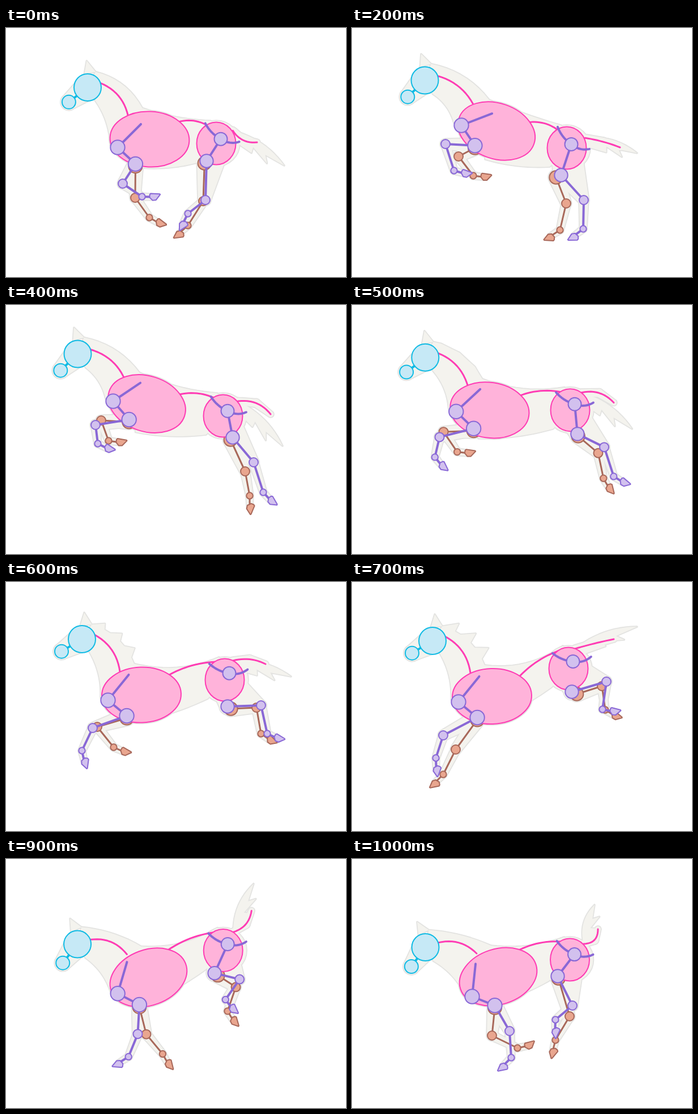
These frames come from a looping animation (600 by 440 pixels, 1100 ms). An HTML page with a canvas:

```html
<!DOCTYPE html>
<html lang="en">
<head>
<meta charset="utf-8">
<title>Galloping horse</title>
<style>
html, body { margin: 0; width: 100%; height: 100%; overflow: hidden; background: #fff; }
canvas { display: block; }
</style>
</head>
<body>
<canvas id="stage" width="600" height="440"></canvas>
<script>
const ctx = document.getElementById('stage').getContext('2d');
const STEP = 100, STEPS = 11, KEYS = [0, 2, 4, 6, 7, 8, 10];
const PINK = ['#ffb3da', '#ff3cb4'], BLUE = ['#c6e9f6', '#10bbe4'];
const VIOLET = ['#d2c1ee', '#8968d6'], BROWN = ['#e9a68f', '#a8685a'];
const COAT = '#f4f3ee', EDGE = '#e3e3e1';

// --- Motion: smooth cyclic tracks through one point or angle per key step ---

function track(...values) {
  const n = KEYS.length, size = values.length / n;
  const key = i => {
    const turn = Math.floor(i / n), k = i - turn * n;
    return { t: KEYS[k] + turn * STEPS, v: values.slice(k * size, (k + 1) * size) };
  };
  return step => {
    const i = KEYS.findLastIndex(t => t <= step);
    const [a, b, c, d] = [i - 1, i, i + 1, i + 2].map(key);
    const h = c.t - b.t, u = (step - b.t) / h, w = 1 - u;
    return b.v.map((y, k) => {
      const m = (c.v[k] - a.v[k]) / (c.t - a.t) * h;
      const q = (d.v[k] - y) / (d.t - b.t) * h;
      return y * w * w * (1 + 2 * u) + c.v[k] * u * u * (3 - 2 * u) + u * w * (m * w - q * u);
    });
  };
}

const wave = (step, peak) => Math.cos(2 * Math.PI * (step - peak) / STEPS);

const body = {
  skull: track(144,105, 128.5,92.5, 126.5,86.5, 134,101, 142,104, 127.5,132, 129.5,156),
  nod: track(142, 136, 136, 149, 149, 135, 126),
  chest: track(253.5,196.5, 255,182, 248.5,174.5, 239,199.5, 247,202, 244.5,208, 258,208),
  tilt: track(3, 19, 18, -2, -2, -17, -18),
  rump: track(371,204, 379,212, 383,196, 386,173, 382,153, 380,150, 384.5,178),
  shoulder: track(197,211, 193,172, 189,170, 180,209, 188,212, 181,225, 212,243),
  scapula: track(-45, -21, -34, -51, -51, -56, -84),
  stifle: track(354,235, 369,260, 400,234, 391,220, 388,194, 374,200, 363,207),
  dock: track(443,202, 473,211, 467,193, 458,145, 462,101, 438,76, 434,124),
  hair: track(491,243, 503,221, 488,249, 503,167, 503,79, 463,40, 428,81)
};

// Lower legs: knee or hock, ankle, and the direction of the hoof.
const nearFore = [
  track(206,275, 165,205, 158,212, 153,258, 161,271, 173,304, 278,304),
  track(240,298, 180,252, 162,245, 134,298, 148,311, 145,335, 281,351),
  track(2, 16, 27, 78, 88, 131, 135)
];
const nearHind = [
  track(352,304, 409,304, 437,278, 450,218, 449,176, 432,174, 389,259),
  track(321,328, 408,355, 454,331, 461,268, 442,225, 414,221, 359,284),
  track(117, 143, 48, 25, 12, 17, 92)
];
const farFore = [
  track(228,300, 188,227, 168,204, 161,256, 183,296, 236,304, 247,312),
  track(253,335, 214,261, 181,240, 190,292, 161,340, 241,353, 292,334),
  track(30, 7, 8, 24, 135, 140, -12)
];
const farHind = [
  track(348,306, 378,310, 422,294, 442,222, 441,184, 424,180, 384,278),
  track(321,349, 367,357, 430,337, 450,268, 447,226, 421,223, 359,320),
  track(138, 147, 90, 36, 32, 21, 104)
];

// --- Geometry ---

const rad = deg => deg * Math.PI / 180;
const add = ([x, y], dx, dy) => [x + dx, y + dy];
const polar = (p, r, deg) => add(p, r * Math.cos(rad(deg)), r * Math.sin(rad(deg)));
const angle = (a, b) => Math.atan2(b[1] - a[1], b[0] - a[0]) * 180 / Math.PI;

// Point at share u of a to b, moved sideways.
const beside = (a, b, u, side) =>
  polar([a[0] + (b[0] - a[0]) * u, a[1] + (b[1] - a[1]) * u], side, angle(a, b) + 90);

const bow = (a, b, bend, n = 12) =>
  Array.from({ length: n + 1 }, (_, i) => beside(a, b, i / n, bend * 4 * i / n * (1 - i / n)));

function poly(pts, closed = true) {
  const path = new Path2D();
  pts.forEach(p => path.lineTo(...p));
  if (closed) path.closePath();
  return path;
}

function ellipse([x, y], rx, ry, tilt = 0) {
  const path = new Path2D();
  path.ellipse(x, y, rx, ry, rad(tilt), 0, 7);
  return path;
}

// Two discs of different size joined by straight sides.
function taper(a, ra, b, rb) {
  const path = new Path2D(), t = rad(angle(a, b)), q = Math.PI / 2;
  path.arc(...a, ra, t + q, t + 3 * q);
  path.arc(...b, rb, t - q, t + q);
  path.closePath();
  return path;
}

// --- Drawing ---

function stroke(path, color, width) {
  ctx.strokeStyle = color;
  ctx.lineWidth = width;
  ctx.stroke(path);
}

function shape(path, [fill, line]) {
  ctx.fillStyle = fill;
  ctx.fill(path);
  stroke(path, line, 2);
}

const disc = (p, r, colors) => shape(ellipse(p, r, r), colors);
const line = (pts, color, width) => stroke(poly(pts, false), color, width);

const HOOF = [[9, -5], [8, -6], [-8, -6], [-9.5, -4], [-9.5, 1], [-4, 6], [2, 5]];

function leg({ top, knee, ankle, aim }, r, colors, width) {
  const center = polar(ankle, 23, aim);
  line([top, knee, ankle, polar(ankle, 16, aim)], colors[1], width);
  // The sole turns faster than the pastern, so it lies flat on the ground.
  const turn = 1.25 * aim;
  shape(poly(HOOF.map(([x, y]) => polar(polar(center, x, turn), y, turn + 90))), colors);
  disc(top, r, colors);
  disc(knee, 8, colors);
  disc(ankle, 5.7, colors);
}

const legCoat = ({ top, knee, ankle, aim }) => [
  taper(top, 13, knee, 9), taper(knee, 8, ankle, 6), taper(ankle, 6, polar(ankle, 20, aim), 5)
];

function tailCoat(root, hair, spine) {
  const at = (u, side) => beside(root, hair, u, side), mid = spine[6], end = spine[12];
  return [
    poly([...bow(root, hair, -10), at(.65, 3), at(.75, 14), at(.42, 4), at(.45, 14), at(.1, 14)]),
    taper(root, 6, mid, 7), taper(mid, 7, end, 5)
  ];
}

function draw(step) {
  const b = {};
  for (const name in body) b[name] = body[name](step);
  const { skull, chest, rump, shoulder, stifle, hair } = b;
  const [nod] = b.nod, [tilt] = b.tilt, [scapula] = b.scapula;

  const sway = 15 * wave(step, 1.7);
  const muzzle = polar(skull, 42, nod);
  const elbow = polar(shoulder, 43, 43 + .55 * (scapula + 45));
  const hip = add(rump, 8, .2 * sway - 9.5);
  const limb = (top, [knee, ankle, aim]) =>
    ({ top, knee: knee(step), ankle: ankle(step), aim: aim(step)[0] });
  const legs = {
    farFore: limb(add(elbow, 0, 4), farFore),
    farHind: limb(add(stifle, -9 * wave(step, 2), 4), farHind),
    nearFore: limb(elbow, nearFore),
    nearHind: limb(stifle, nearHind)
  };

  const root = polar(rump, 37, 1.45 * sway - 50);
  const tail = bow(root, b.dock, 9 * wave(step, 9.9));
  const neck = bow(add(skull, 22, -8), add(chest, -38, -41), -10);
  const back = bow(polar(chest, 60, tilt - 34), add(rump, -16, -32), -5);

  // Coat around the skeleton; the mane lifts while the forehand comes down.
  const poll = polar(skull, 31, nod + 155), withers = add(chest, -13, -55);
  const lift = 18 * Math.max(0, wave(step, 6.8)) ** 4;
  const crest = bow(poll, withers, -.18 * (withers[1] - poll[1]), 9)
    .map((p, i) => i % 3 === 1 ? add(p, lift, -lift / 2) : p);
  const throat = bow(add(shoulder, -13, -4), add(skull, 14, 24), 6);
  const topline = bow(withers, add(rump, -10, -40), 8 - .4 * sway);
  const belly = bow(add(rump, -30, 33), add(chest, -20, 50), -5);
  const coat = [
    ...tailCoat(root, hair, tail),
    ...Object.values(legs).flatMap(legCoat),
    taper(rump, 30, stifle, 14), taper(rump, 26, legs.nearHind.knee, 9),
    ellipse(rump, 41, 40), ellipse(chest, 71, 50, tilt),
    poly([...topline, rump, ...belly]),
    poly([...crest, chest, ...throat, skull]),
    poly([polar(skull, 25, nod + 115), polar(skull, 47, nod + 126), poll]),
    taper(skull, 22, muzzle, 14)
  ];

  ctx.clearRect(0, 0, 600, 440);
  ctx.lineCap = ctx.lineJoin = 'round';
  coat.forEach(p => stroke(p, EDGE, 3.6));
  ctx.fillStyle = COAT;
  coat.forEach(p => ctx.fill(p));

  leg(legs.farFore, 12, BROWN, 3);
  leg(legs.farHind, 11.7, BROWN, 3);

  [neck, back, tail].forEach(p => line(p, PINK[1], 3));
  shape(ellipse(chest, 70, 49, tilt), PINK);
  shape(ellipse(rump, 34.5, 37.5), PINK);

  line([skull, muzzle], BLUE[1], 4);
  disc(skull, 24, BLUE);
  disc(muzzle, 12, BLUE);

  line(bow(polar(hip, 39, sway + 217), hip, 3), VIOLET[1], 4);
  line(bow(hip, polar(hip, 33, sway), 4), VIOLET[1], 4);
  const thighHidden = step === 6 || step === 7;
  if (!thighHidden) line([hip, stifle], VIOLET[1], 4);
  disc(hip, 11.5, VIOLET);
  leg(legs.nearHind, 11.7, VIOLET, 4);

  line([polar(shoulder, 58, scapula), shoulder, elbow], VIOLET[1], 4);
  disc(shoulder, 12.7, VIOLET);
  leg(legs.nearFore, 12.7, VIOLET, 4);
}

const start = performance.now();
function tick() {
  draw(Math.floor((performance.now() - start) / STEP) % STEPS);
  requestAnimationFrame(tick);
}
tick();
</script>
</body>
</html>
```
